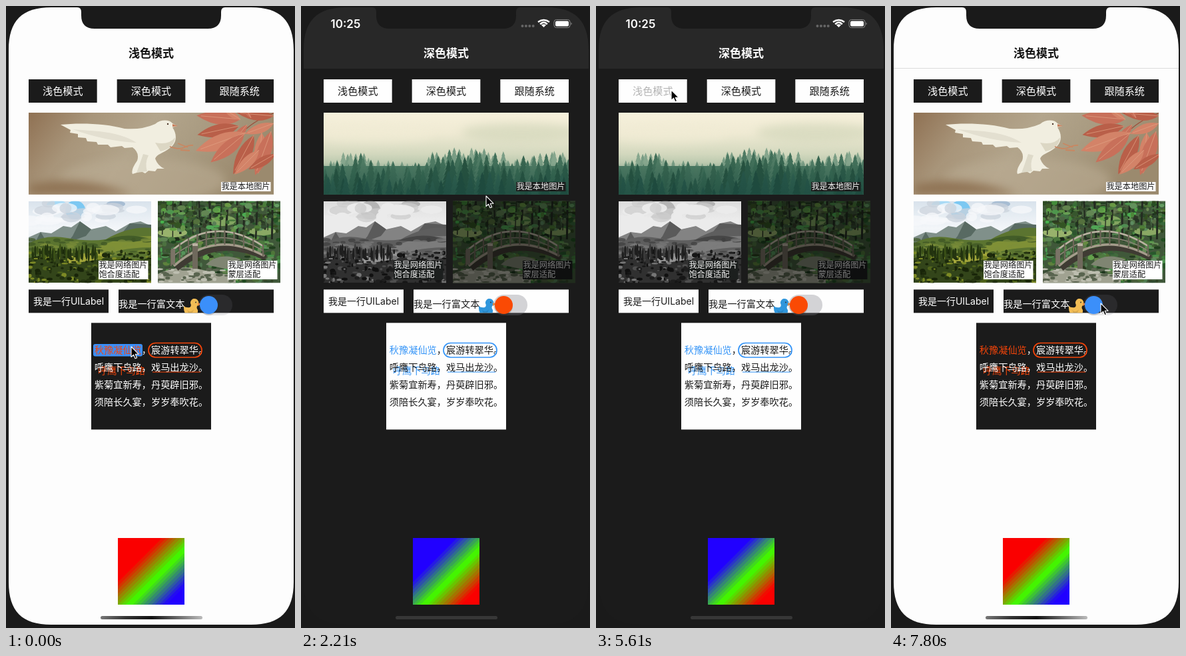
Recreate the animation shown at these times as an HTML page. Size 434 by 933 pixels, loop 7900 ms.

```html
<!DOCTYPE html>
<html lang="zh-CN">
<head>
<meta charset="utf-8">
<title>浅色模式 / 深色模式</title>
<style>
  html, body { margin: 0; width: 100%; height: 100%; overflow: hidden; background: #1a1a1a; }
  #stage { display: block; width: 100vw; height: 100vh; }
  text { font-family: Inter, "Noto Sans CJK SC", "Noto Sans CJK", sans-serif; white-space: pre; }
  .mid { text-anchor: middle; }
  .soft { filter: blur(7px); }
  .gray { filter: grayscale(1) contrast(1.15) brightness(.92); }
</style>
</head>
<body>
<svg id="stage" viewBox="0 0 434 933"></svg>
<script>
const LOOP = 7900, STEP = 147.2;
const THEMES = {
  light: { screen: '#fdfdfd', box: '#1b1b1b', ink: '#fff', dim: '#4a4a4a', accent: '#f4450a', other: '#3b8ffa',
           tag: '#fff', tagInk: '#1b1b1b', title: '#111', track: 'rgba(120,120,128,.16)', duck: '#f3bd55' },
  dark: { screen: '#1b1b1b', box: '#fefefe', ink: '#1b1b1b', dim: '#b4b4b4', accent: '#3494f7', other: '#fa4a04',
          tag: '#1c1f1e', tagInk: '#f2f2f2', title: '#fff', track: 'rgba(120,120,128,.32)', duck: '#2f96dc' }
};
const BUTTONS = ['浅色模式', '深色模式', '跟随系统'];
const SCREEN = 'M4 66C4 22 24 2 68 2H107Q113 2 113 9V14Q113 34 133 34H303Q323 34 323 14V9Q323 2 329 2H368' +
  'C412 2 432 22 432 66V864C432 908 412 928 368 928H68C24 928 4 908 4 864Z';

const random = seed => () => (seed = seed * 16807 % 2147483647) / 2147483647;
const rect = (x, y, w, h, fill, extra = '') => `<rect x="${x}" y="${y}" width="${w}" height="${h}" fill="${fill}" ${extra}/>`;
const path = (d, fill, extra = '') => `<path d="${d}" fill="${fill}" ${extra}/>`;
const line = (d, stroke, width) => path(d, 'none', `stroke="${stroke}" stroke-width="${width}"`);
const oval = (x, y, rx, ry, fill, extra = '') => `<ellipse cx="${x}" cy="${y}" rx="${rx}" ry="${ry}" fill="${fill}" ${extra}/>`;
const text = (x, y, size, fill, words, extra = '') => `<text x="${x}" y="${y}" font-size="${size}" fill="${fill}" ${extra}>${words}</text>`;
const repeat = (n, make) => Array.from({ length: n }, (_, i) => make(i)).join('');
const picture = (x, y, w, h, body) =>
  `<svg x="${x}" y="${y}" width="${w}" height="${h}" viewBox="${x} ${y} ${w} ${h}">${body}</svg>`;
const gradient = (id, stops, vector = 'x2="0" y2="1"') => `<linearGradient id="${id}" ${vector}>` +
  stops.map((color, i) => `<stop offset="${i / (stops.length - 1)}" stop-color="${color}"/>`).join('') + '</linearGradient>';

function conifer(x, base, h, fill) {
  const tiers = 8;
  let left = '', right = '';
  for (let i = 1; i <= tiers; i++) {
    const y = base - h + h * i / tiers, w = h * .24 * i / tiers + 1;
    right += `L${x + w} ${y}L${x + w * .6} ${y - 1}`;
    left = `L${x - w * .6} ${y - 1}L${x - w} ${y}` + left;
  }
  return path(`M${x} ${base - h}${right}${left}Z`, fill);
}

function dove() {
  const leaves = [
    [352, 170, 185, 66], [350, 180, 168, 64], [352, 170, 212, 30], [362, 178, 130, 38], [402, 165, 185, 56],
    [360, 190, 160, 80], [358, 192, 140, 66], [372, 194, 118, 66], [384, 190, 95, 62], [398, 188, 110, 70],
    [404, 198, 75, 60], [402, 176, 160, 46], [368, 168, 240, 24], [404, 222, 150, 46], [380, 216, 135, 52]
  ];
  const leaf = ([x, y, angle, n], i) => `<g transform="translate(${x} ${y}) rotate(${angle})">` +
    path(`M0 0Q${n * .4} ${-n * .32} ${n} 0Q${n * .45} ${n * .28} 0 0`, ['#c8705a', '#b95f49', '#d38368'][i % 3]) +
    line(`M0 0H${n * .9}`, '#e0a083', .7) + '</g>';
  return rect(34, 160, 368, 123, 'url(#dusk)') +
    oval(205, 262, 125, 34, '#b9ab92', 'class="soft" opacity=".6"') +
    path('M34 283V268Q110 252 190 283Z', '#8f7354', 'class="soft"') +
    path('M82 178C110 175 150 176 178 184Q204 186 224 177C232 170 245 170 250 176L257 180L250 182C258 194 256 206 246 213' +
      'C236 221 226 222 224 229Q228 240 238 244L227 244L224 248L214 247L209 251L203 248L190 252Q187 246 197 232Q201 220 190 212' +
      'L178 213L174 210L157 212L153 208L138 208L136 204L122 203L120 198L108 197L108 192L96 190L97 186Z', '#f1eee0') +
    path('M100 185Q150 203 196 205Q176 192 140 188Z', '#e3dfd0') +
    path('M206 222Q200 240 196 250L212 248Q208 236 214 224Z', '#dedac9') +
    path('M224 205Q245 209 254 197Q252 214 232 218Z', '#dcd7c4') +
    oval(243, 177, 1.2, 1.2, '#4a3528') + path('M250 177L258 180L250 181Z', '#c77b58') +
    line('M246 211Q260 216 268 212T281 209M258 206L273 212M262 216L276 217', '#c88762', 1.8) +
    line('M404 160Q370 172 350 195', '#9b4c38', 1.2) + leaves.map(leaf).join('');
}

function forest() {
  const r = random(91);
  const row = (n, top, spread, fills) => repeat(n, i => {
    const x = 34 + 368 * (i + r()) / n;
    const lift = 6 * Math.cos((x - 75) / 28) + (x > 190 ? 8 : 0);
    const y = top + r() * spread - lift;
    return conifer(x, y + 62, 62, fills[i % fills.length]);
  });
  return rect(34, 160, 368, 123, 'url(#mist)') +
    oval(330, 190, 90, 14, '#cdd3b6', 'class="soft" opacity=".6"') +
    oval(110, 192, 90, 14, '#f1ecd5', 'class="soft" opacity=".6"') +
    row(60, 224, 14, ['#86a68d', '#799c84']) + rect(34, 240, 368, 43, '#4c7a63') +
    row(44, 225, 20, ['#416f59', '#4e7a63', '#37644f']) + row(40, 240, 18, ['#2c5a48', '#386852', '#26513f']) +
    row(36, 256, 18, ['#28574a', '#306151', '#1f4a3d']) + rect(34, 235, 368, 48, 'url(#shade)');
}

function mountains() {
  const r = random(37);
  return rect(34, 293, 184, 122, 'url(#sky)') +
    oval(104, 306, 15, 14, '#7cc8f2') + oval(76, 299, 15, 8, '#a9daf5') + oval(165, 297, 14, 5, '#a7bdd3') +
    repeat(24, () => oval(34 + r() * 184, 296 + r() * 30, 7 + r() * 14, 3 + r() * 5, r() > .4 ? '#f7f9fb' : '#cbd3dc', 'opacity=".75"')) +
    path('M34 347L52 339L68 341L86 330L98 332L111 323L128 335L150 330L165 338L186 326L202 323L218 330V380H34Z', '#80908a') +
    path('M111 323L100 345L92 355L120 345L128 335ZM186 326L170 346L200 350L218 336V328ZM52 339L60 352L44 354Z', '#586a62') +
    path('M34 356Q60 342 92 348T150 350Q185 330 218 333V415H34Z', '#5b7430') +
    path('M120 372Q160 345 218 345V362Q165 362 138 380Z', '#7f9036') +
    path('M146 352Q180 338 218 350L190 354Z', '#425c28') +
    repeat(60, () => oval(34 + r() * 184, 350 + r() * 24, 3 + r() * 6, 1 + r() * 2, r() > .5 ? '#3c5524' : '#7c8f3a', 'opacity=".7"')) +
    path('M34 378Q90 364 150 376T218 373V415H34Z', '#33451a') +
    path('M90 378Q130 364 160 374Q130 384 92 386Z', '#a4a73b') +
    repeat(220, () => oval(34 + r() * 184, 368 + r() * 48, 1 + r() * 4, 1 + r() * 2.5,
      ['#182409', '#243310', '#50641c', '#7d8a25', '#1d2a0c'][Math.floor(r() * 5)])) +
    repeat(34, i => oval(36 + i * 3 + r() * 4, 366 + r() * 9, 1.6, 5 + r() * 8, i % 3 ? '#22330f' : '#3a5017'));
}

function garden() {
  const r = random(53);
  const arc = (a, c, b) => t => (1 - t) * (1 - t) * a + 2 * t * (1 - t) * c + t * t * b;
  const x = arc(248, 312, 386), top = arc(368, 312, 360), low = arc(390, 334, 376);
  const foliage = (n, y, h, light) => repeat(n, () => oval(228 + r() * 184, y + r() * h, 1.5 + r() * 5, 1 + r() * 3.5,
    `hsl(${90 + r() * 35} ${18 + r() * 24}% ${light + r() * 32}%)`));
  return rect(228, 292, 184, 124, '#40583a') + foliage(330, 292, 60, 12) +
    oval(250, 340, 22, 7, '#98b26c') + oval(325, 322, 20, 8, '#82a560') + oval(385, 338, 20, 6, '#8aa864') +
    repeat(13, i => line(`M${232 + i * 14 + r() * 8} 292l${r() * 6 - 3} ${44 + r() * 20}`, '#232a20', 1 + r() * 3)) +
    foliage(140, 294, 44, 18) + foliage(260, 350, 64, 16) +
    path('M228 402Q262 386 296 396T345 400V416H228Z', '#a0a291') + path('M300 388Q320 368 352 380L338 396Z', '#7f8572') +
    repeat(60, () => oval(230 + r() * 118, 394 + r() * 20, 2 + r() * 4, 1 + r() * 2, r() > .5 ? '#bdbeb0' : '#59644f')) +
    line('M256 394Q318 342 390 378', '#3f3b33', 8) + line('M252 390Q314 334 388 375', '#a59c8c', 3.5) +
    line('M248 368Q312 312 386 360', '#bab2a2', 2.6) + line('M248 378Q312 323 386 367', '#8d8678', 1.6) +
    repeat(11, i => line(`M${x(i / 10)} ${top(i / 10) - 2}V${low(i / 10)}`, '#6e6759', 2.2)) +
    rect(280, 357, 8, 37, '#6f695c') + rect(280, 356, 8, 4, '#bab2a2') + rect(248, 364, 6, 24, '#7b7467');
}

function tag(theme, x, y, rows) {
  return rect(x, y, 74.5, 14 * rows.length, theme.tag) +
    rows.map((words, i) => text(x + .4, y + 11.3 + 14 * i, 12.2, theme.tagInk, words)).join('');
}

const duck = theme => picture(264, 438, 28, 22.3,
  path('M267 450Q270 453 276 452Q279 450 277 446A6.2 6.2 0 1 1 288 449Q285 452 288 456Q289 464 279 465Q266 466 267 450Z', theme.duck) +
  path('M288 445L293 447L288 450Z', '#f08a3c') + oval(285, 444.5, .9, .9, '#333') +
  path('M272 456Q278 461 282 455Q280 463 274 461Z', '#000', 'opacity=".12"'));

function statusBar() {
  return text(44.5, 32.5, 17, '#fff', '10:25', 'font-weight="600"') +
    repeat(4, i => oval(332.5 + i * 5.4, 30, 2, 2, '#666')) +
    [[8.5, 21], [5.3, 24.4]].map(([w, y]) => line(`M${364.5 - w} ${y + 3}Q364.5 ${y - 3} ${364.5 + w} ${y + 3}`, '#fff', 2.5)).join('') +
    path('M364.5 32L361 28.5Q364.5 26 368 28.5Z', '#fff') +
    rect(380, 20.5, 24, 12, 'none', 'rx="3.5" stroke="#888"') + rect(382, 22.5, 20, 8, '#fff', 'rx="2"') +
    path('M405.5 24.5Q408 26.5 405.5 28.5Z', '#888');
}

function scene(name) {
  const theme = THEMES[name], dark = name === 'dark';
  const hills = picture(34, 292.67, 184, 122.67, mountains());
  return `<g id="${name}">` + path(SCREEN, theme.screen) +
    (dark ? `<g clip-path="url(#nav)">${path(SCREEN, '#282828')}</g>` + statusBar() : '') +
    text(218, 77.3, 17, theme.title, dark ? '深色模式' : '浅色模式', 'class="mid" font-weight="600"') +
    BUTTONS.map((words, i) => rect(34 + 132.67 * i, 110, 102.67, 35, theme.box) +
      text(85.3 + 132.67 * i, 133.4, 15.1, theme.ink, words, `class="mid" id="${name}Button${i}"`)).join('') +
    picture(34, 160, 368, 122.67, dark ? forest() : dove()) + tag(theme, 323, 264, ['我是本地图片']) +
    (dark ? `<g class="gray">${hills}</g>` : hills) + tag(theme, 139, 382, ['我是网络图片', '饱合度适配']) +
    picture(228, 292.67, 184, 122.67, garden()) + tag(theme, 333, 382, ['我是网络图片', '蒙层适配']) +
    (dark ? rect(228, 292.67, 184, 122.67, '#000', 'opacity=".5"') : '') +
    rect(34, 425.33, 120, 35, theme.box) + text(94, 448, 14, theme.ink, '我是一行UILabel', 'class="mid"') +
    rect(169, 425.33, 233, 35, theme.box) + text(169, 452.4, 14.2, theme.ink, '我是一行富文本') + duck(theme) +
    rect(142, 915, 153, 5, dark ? '#373737' : 'url(#home)', 'rx="2.5"') + '</g>';
}

function panel(name) {
  const { box, ink, accent, other } = THEMES[name];
  const row = (i, words) => text(218, 521.3 + 26 * i, 14.2, ink, words, 'class="mid"');
  return `<g id="${name}Panel">` + rect(128, 475.33, 180, 160, box) +
    rect(131, 507, 74, 18.5, other, `rx="3" id="${name}Mark"`) +
    row(0, `<tspan fill="${accent}">秋豫凝仙览</tspan>，宸游转翠华。`) +
    rect(214, 505.5, 80, 21.5, 'none', `rx="10.5" stroke="${accent}" stroke-width="1.7"`) +
    text(138, 552.3, 14.2, accent, '呼鹰下鸟路') + row(1, '呼鹰下鸟路，戏马出龙沙。') +
    rect(220, 548.6, 72, 1, accent) + row(2, '紫菊宜新寿，丹萸辟旧邪。') + row(3, '须陪长久宴，岁岁奉吹花。') + '</g>';
}

document.getElementById('stage').innerHTML = '<defs>' +
  gradient('dusk', ['#8f7153', '#a8957a', '#b3a58c', '#a89a80', '#9b8a6e'], 'x2="1" y2=".25"') +
  gradient('mist', ['#f6f0db', '#efead3', '#d3d8be', '#9fb79c', '#4f7d66']) +
  gradient('shade', ['#1d4a3f00', '#1d4a3f99']) +
  gradient('sky', ['#d9e3ec', '#f3f6f9', '#dfe6ea', '#c5d1d4']) +
  gradient('home', ['#777', '#333', '#111', '#666', '#bbb'], 'x2="1" y2="0"') +
  gradient('rainbow', [], 'x2="1" y2="1"') +
  `<clipPath id="nav">${rect(0, 0, 434, 94, '#000')}</clipPath></defs>` +
  rect(0, 0, 434, 933, '#1a1a1a') + scene('light') + rect(4, 93, 428, 1, '#dcdcdc', 'id="navLine"') + scene('dark') +
  panel('light') + panel('dark') +
  rect(289, 433, 51, 31, 'none', 'rx="15.5" id="track"') + rect(289, 433, 51, 31, 'none', 'rx="15.5" id="trackOn"') +
  `<g id="knob">${oval(0, 2, 13.5, 13.5, '#000', 'opacity=".14"')}<circle id="knobFace" r="13.5"/></g>` +
  rect(168, 798, 100, 100, 'url(#rainbow)') +
  path('M0 0V15.5L3.6 12.2L6 17.8L8.6 16.7L6.2 11.2H11Z', '#000', 'id="cursor" stroke="#fff" stroke-width="1.1" stroke-linejoin="round"');

const $ = id => document.getElementById(id);
const show = (id, opacity) => $(id).setAttribute('opacity', +opacity);

// Key poses: [step, ...values]
const CURSOR = [[0, 188, 511], [5, 188, 511], [10, 231, 128], [13, 231, 127], [17, 325, 443], [24, 325, 443], [26, 240, 490],
  [28, 156, 534], [29, 188, 511], [32, 188, 511], [37, 113, 126], [40, 113, 126], [42, 325, 408], [44, 325, 443],
  [49, 325, 443], [51, 315, 446]];
const SWITCH = [[18, 0], [20, 1], [21, 1], [23, 0], [45, 0], [47, 1], [50, 1], [52, 0]];
const PANEL = [[11, 0], [12, .34], [13, 1], [38, 1], [39, .66], [40, 0]];
const RAINBOW = [[11, 0], [12, .16], [13, .85], [14, 1], [38, 1], [39, .84], [40, .15], [41, 0]];

function pose(keys, step) {
  const next = keys.findIndex(key => key[0] > step);
  if (next === 0) return keys[0].slice(1);
  if (next < 0) return keys[keys.length - 1].slice(1);
  const a = keys[next - 1], b = keys[next];
  const p = (step - a[0]) / (b[0] - a[0]), eased = p * p * (3 - 2 * p);
  return a.slice(1).map((v, i) => v + (b[i + 1] - v) * eased);
}

function paintRainbow(swap) {
  const mix = (a, b, p) => a.map((v, i) => v + (b[i] - v) * p);
  const red = [250, 0, 0], green = [68, 245, 0], blue = [33, 0, 255];
  const first = mix(red, blue, swap), last = mix(blue, red, swap);
  const bands = 36, clamp = v => Math.min(1, Math.max(0, v));
  $('rainbow').innerHTML = repeat(bands, i => {
    const at = (i + .5) / bands;
    const color = at < .58 ? mix(first, green, clamp((at - .32) / .25)) : mix(green, last, clamp((at - .6) / .26));
    const rgb = `rgb(${color.map(Math.round)})`;
    return [i, i + 1].map(edge => `<stop offset="${edge / bands}" stop-color="${rgb}"/>`).join('');
  });
}

function render(step) {
  const dark = step >= 12 && step < 39, name = dark ? 'dark' : 'light', theme = THEMES[name];
  show('light', !dark);
  show('dark', dark);
  show('navLine', step >= 11 && !dark);
  $('navLine').setAttribute('x', step === 11 ? 47 : 4);
  $('navLine').setAttribute('width', step === 11 ? 205 : 428);
  const pressed = step >= 10 && step < 14 ? 1 : step >= 38 && step < 41 ? 0 : -1;
  BUTTONS.forEach((_, i) => $(name + 'Button' + i).setAttribute('fill', i === pressed ? theme.dim : theme.ink));

  const [panelMix] = pose(PANEL, step);
  show('lightPanel', panelMix < 1);
  show('darkPanel', panelMix);
  show('lightMark', step < 3 ? 1 : step === 3 ? .4 : 0);
  show('darkMark', step >= 30 && step < 33);
  paintRainbow(pose(RAINBOW, step)[0]);

  const [on] = pose(SWITCH, step);
  $('track').setAttribute('fill', theme.track);
  $('trackOn').setAttribute('fill', theme.accent);
  show('trackOn', on);
  $('knobFace').setAttribute('fill', theme.other);
  $('knob').setAttribute('transform', `translate(${304.5 + 20.5 * on} 448.5)`);
  $('cursor').setAttribute('transform', `translate(${pose(CURSOR, step)})`);
}

let shown = -1;
function tick(now) {
  const step = Math.floor((now % LOOP + 5) / STEP);
  if (step !== shown) render(shown = step);
  requestAnimationFrame(tick);
}
render(0);
requestAnimationFrame(tick);
</script>
</body>
</html>
```
